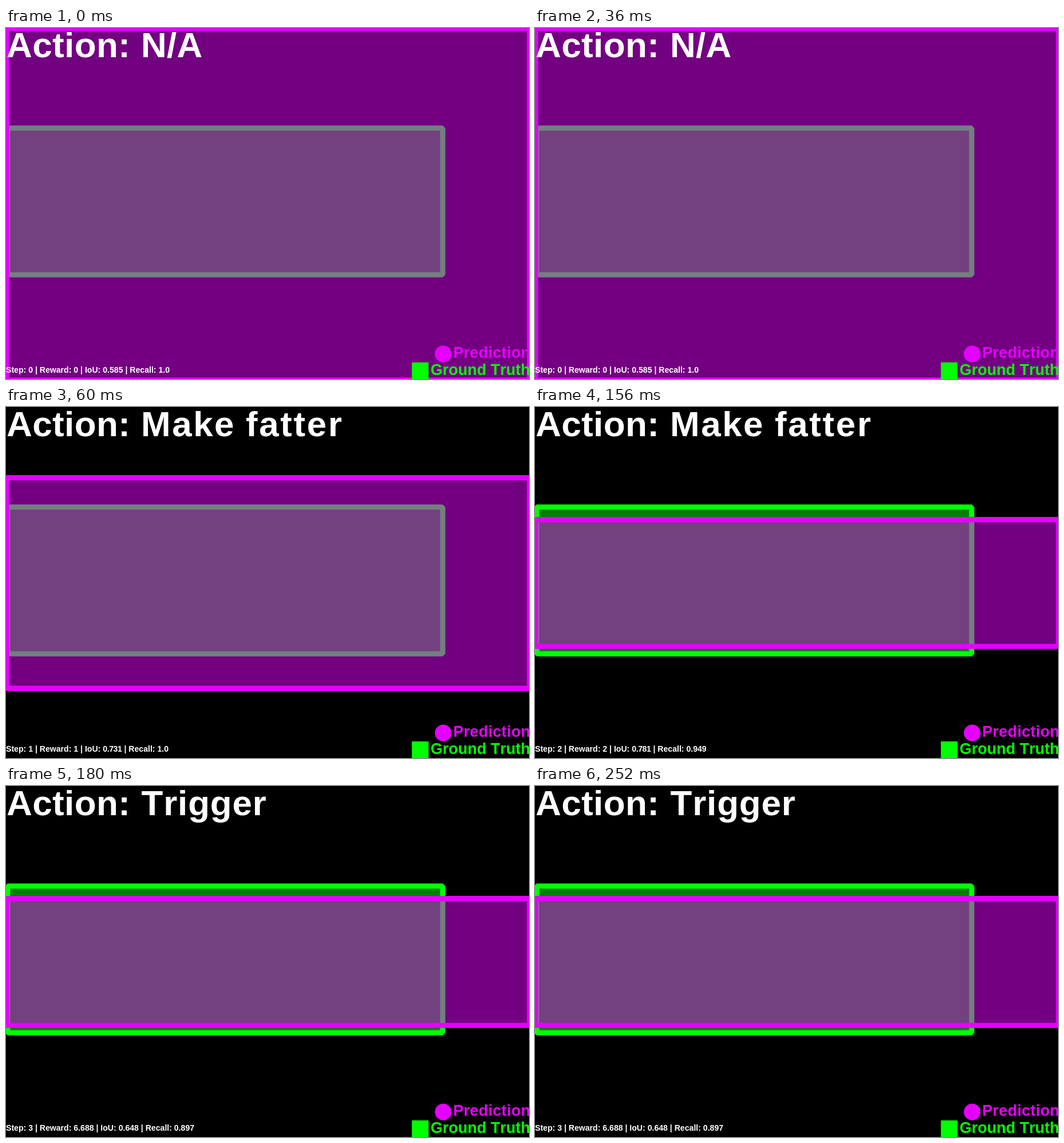
Animation of 914 by 613 pixels, one loop 0.3 s. Source, as an HTML page:

```html
<!DOCTYPE html>
<html lang="en">
<head>
<meta charset="utf-8">
<title>Box refinement steps</title>
<style>
  html, body { margin: 0; width: 100%; height: 100%; overflow: hidden; background: #000; }
  svg { display: block; width: 914px; height: 613px; }
  text { font-family: "Liberation Sans", Arial, sans-serif; font-weight: bold; font-kerning: none; white-space: pre; }
  .box { stroke-width: 5; stroke-linejoin: bevel; }
  .truth { fill: #008000; stroke: #0f0; }
  .shade { fill: #e600ff; fill-opacity: .5; }
  .prediction { fill: none; stroke: #e600ff; }
  .action { font-size: 62px; fill: #fff; }
  .status { font-size: 14.1px; fill: #fff; }
  .legend { font-size: 27px; }
</style>
</head>
<body>
<svg viewBox="0 0 914 613">
  <!-- boxes live on a 500 by 335 grid -->
  <g transform="scale(1.828 1.83)">
    <rect class="box truth" x="1.5" y="95.5" width="416" height="140"/>
    <g id="boxes"></g>
  </g>
  <g id="captions"></g>
  <g class="legend" fill="#e600ff">
    <circle cx="764" cy="569.3" r="14.5"/>
    <text x="781.5" y="576" letter-spacing=".3">Prediction</text>
  </g>
  <g class="legend" fill="#0f0">
    <rect x="709.3" y="584" width="29.2" height="29"/>
    <text x="742" y="606">Ground Truth</text>
  </g>
</svg>
<script>
  const LOOP = 300;
  const boxes = document.getElementById("boxes");
  const captions = document.getElementById("captions");
  const makeFatter = [["Make", 236, 2.5], ["fatter", 419, 2.6]];

  // words: [text, x, letter spacing]; top and bottom are grid rows
  const steps = [
    { start: 0, top: 0, bottom: 335.5, words: [["N/A", 236, .3]],
      reward: "0", iou: "0.585", recall: "1.0", iouSpacing: 0 },
    { start: 60, top: 67, bottom: 268, words: makeFatter,
      reward: "1", iou: "0.731", recall: "1.0", iouSpacing: -.4 },
    { start: 120, top: 107, bottom: 228, words: makeFatter,
      reward: "2", iou: "0.781", recall: "0.949", iouSpacing: -.4 },
    { start: 180, top: 107, bottom: 228, words: [["Trigger", 236.5, .8]],
      reward: "6.688", iou: "0.648", recall: "0.897", iouSpacing: 0 }
  ];

  function add(parent, tag, attributes = {}, content = "") {
    const node = document.createElementNS("http://www.w3.org/2000/svg", tag);
    for (const [key, value] of Object.entries(attributes)) node.setAttribute(key, value);
    node.textContent = content;
    return parent.appendChild(node);
  }

  // One keyframe per step: visible only while its own step lasts.
  function showDuring(node, step) {
    const frames = steps.map(other => ({
      offset: other.start / LOOP,
      opacity: other === step ? 1 : 0,
      easing: "step-end"
    }));
    frames.push({ ...frames.at(-1), offset: 1 });
    node.animate(frames, { duration: LOOP, iterations: Infinity });
  }

  steps.forEach((step, index) => {
    const box = add(boxes, "g");
    const area = { x: .5, y: step.top + .5, width: 500, height: step.bottom - step.top };
    add(box, "rect", { class: "shade", ...area });
    add(box, "rect", { class: "box prediction", ...area });

    const caption = add(captions, "g");
    for (const [word, x, spacing] of [["Action:", 1, .4], ...step.words])
      add(caption, "text", { class: "action", x, y: 51, "letter-spacing": spacing }, word);

    const status = add(caption, "text", { class: "status", x: 0, y: 602 },
      `Step: ${index} | Reward: ${step.reward} | IoU: `);
    add(status, "tspan", { "letter-spacing": step.iouSpacing }, step.iou);
    add(status, "tspan", {}, ` | Recall: ${step.recall}`);

    showDuring(box, step);
    showDuring(caption, step);
  });
</script>
</body>
</html>
```
